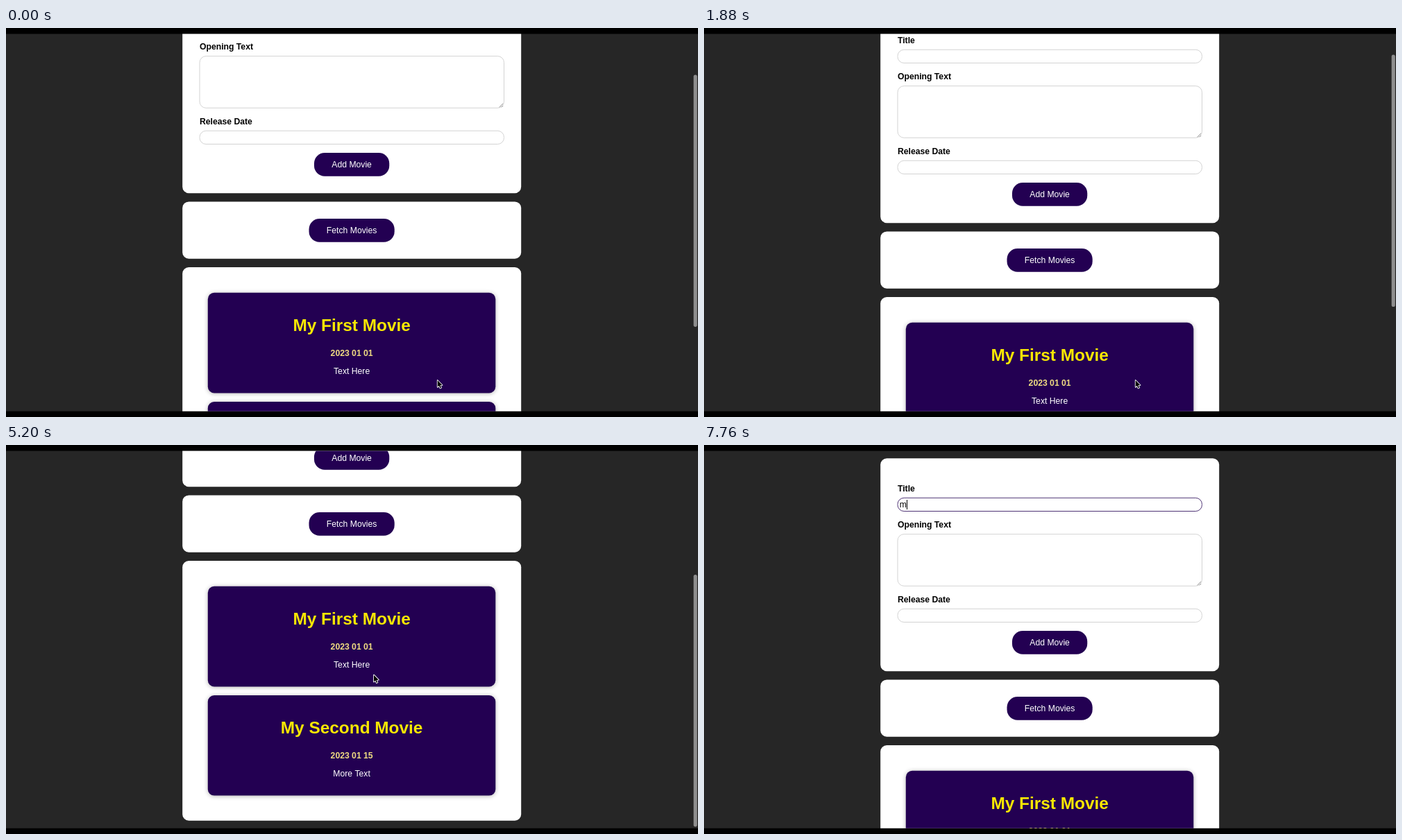
These frames come from a looping animation (997 px wide and 561 px high, 8000 ms). An HTML page with a canvas:

```html
<!DOCTYPE html>
<html lang="en">
<head>
<meta charset="utf-8">
<title>Movies</title>
<style>
html, body { margin: 0; width: 100%; height: 100%; overflow: hidden; background: #000; }
canvas { display: block; width: 997px; height: 561px; }
</style>
</head>
<body>
<canvas id="stage" width="997" height="561"></canvas>
<script>
const ctx = document.getElementById('stage').getContext('2d');
const LOOP = 8000, STEP = 40;
const CX = 498.1, SIZE = 12.2, RADIUS = 9.15;
const FONT = '"Liberation Sans", Arial, sans-serif';
const PURPLE = '#230052';

// Keys: [ms, value, slope per second]
const SCROLL = [
  [0, 88, 1000], [240, 266, 0], [680, 266, 0], [1280, 106, -200], [1640, 45, -80],
  [1641, 45, 0], [3199, 45, 0], [3200, 0, 0], [3800, 0, 0], [4600, 252, 60],
  [5040, 266, 0], [5200, 266, 0], [5880, 0, 0]
];
const MOUSE_X = [[2180, 621.7, 0], [3000, 530, 0], [5720, 530, 0], [6320, 439.6, 0]];
const MOUSE_Y = [[2180, 508, 0], [3000, 331.7, 0], [5720, 331.7, 0], [6320, 86, 0]];
const BAR_ALPHA = [
  [2160, 1, 0], [2440, 0, 0], [3800, 0, 0], [3840, 1, 0], [6060, 1, 0], [6300, 0, 0]
];
const FIELDS = [[75.9, 20], [128.2, 75.5], [235.9, 20]];
const FOCUS_AT = 6600, BLINK_AT = 7120, TYPE_AT = 7600;

// Cubic Hermite interpolation through the keys
function track(keys, t) {
  if (t <= keys[0][0]) return keys[0][1];
  const i = keys.findIndex(k => k[0] > t);
  if (i < 0) return keys[keys.length - 1][1];
  const [t0, a, m0] = keys[i - 1], [t1, b, m1] = keys[i];
  const d = t1 - t0, u = (t - t0) / d, u2 = u * u, u3 = u2 * u;
  return a + (b - a) * (3 * u2 - 2 * u3) +
    (m0 * (u3 - 2 * u2 + u) + m1 * (u3 - u2)) * d / 1000;
}

function box(x, y, w, h, r, fill) {
  ctx.beginPath();
  ctx.roundRect(x, y, w, h, r);
  ctx.fillStyle = fill;
  ctx.fill();
}

function text(str, x, y, color, { size = SIZE, bold = false, align = 'center' } = {}) {
  ctx.font = `${bold ? 'bold ' : ''}${size}px ${FONT}`;
  ctx.textAlign = align;
  ctx.fillStyle = color;
  ctx.fillText(str, x, y);
}

function line(color, width, ...points) {
  ctx.beginPath();
  points.forEach(([x, y], i) => i ? ctx.lineTo(x, y) : ctx.moveTo(x, y));
  ctx.strokeStyle = color;
  ctx.lineWidth = width;
  ctx.stroke();
}

function field([y, h], focused) {
  ctx.beginPath();
  ctx.roundRect(279, y + 0.4, 438.5, h - 0.8, RADIUS);
  ctx.strokeStyle = focused ? PURPLE : '#c8c8c8';
  ctx.lineWidth = 0.8;
  ctx.stroke();
}

function button(label, y, w) {
  box(CX - w / 2, y, w, 33.7, 15.25, PURPLE);
  text(label, CX, y + 21.1, '#fff');
}

function movie(y, title, date, body) {
  ctx.save();
  ctx.shadowColor = 'rgba(0,0,0,.3)';
  ctx.shadowBlur = 6;
  ctx.shadowOffsetY = 0.8;
  box(290.8, y, 414.5, 144.6, RADIUS, PURPLE);
  ctx.restore();
  text(title, CX, y + 54.7, '#f7e702', { size: SIZE * 2, bold: true });
  text(date, CX, y + 91.3, '#f0dc82', { bold: true });
  text(body, CX, y + 117.2, '#fff');
}

function form(t) {
  const label = { bold: true, align: 'left' };
  box(254.2, 19.2, 488, 307, RADIUS, '#fff');
  text('Title', 279, 67, '#000', label);
  text('Opening Text', 279, 119.2, '#000', label);
  text('Release Date', 279, 227.1, '#000', label);
  FIELDS.forEach((f, i) => field(f, i === 0 && t >= FOCUS_AT));
  line('#777', 0.8, [710.8, 202.3], [716.2, 196.9]);
  line('#777', 0.8, [713.9, 202.3], [716.2, 200]);
  button('Add Movie', 268, 108.3);

  const typed = t >= TYPE_AT;
  if (typed) text('m', 281.7, 90.2, '#000', { align: 'left' });
  if (typed || (t >= FOCUS_AT && t < BLINK_AT)) {
    ctx.fillStyle = '#000';
    ctx.fillRect(typed ? 292 : 281.8, 79, 1, 14);
  }
}

function arrow(x, y) {
  ctx.save();
  ctx.translate(x, y);
  ctx.beginPath();
  [[0, 0], [0, 9.8], [2.2, 7.8], [3.8, 11.4], [5.3, 10.7], [3.8, 7.2], [6.8, 7]]
    .forEach(p => ctx.lineTo(...p));
  ctx.closePath();
  ctx.lineJoin = 'round';
  ctx.lineWidth = 1.7;
  ctx.strokeStyle = '#fff';
  ctx.stroke();
  ctx.fillStyle = '#000';
  ctx.fill();
  ctx.restore();
}

function beam(x, y) {
  line('#111', 1.1, [x, y - 4.5], [x, y + 4.5]);
  for (const s of [-1, 1]) {
    line('#111', 1, [x - 2.4, y + s * 5.3], [x, y + s * 4.3], [x + 2.4, y + s * 5.3]);
  }
  line('#111', 0.9, [x - 1.4, y + 1.8], [x + 1.4, y + 1.8]);
}

function draw(t) {
  const scroll = track(SCROLL, t);
  ctx.fillStyle = '#000';
  ctx.fillRect(0, 0, 997, 561);

  ctx.save();
  ctx.beginPath();
  ctx.rect(0, 8.4, 997, 544.4);
  ctx.clip();
  ctx.fillStyle = '#262626';
  ctx.fillRect(0, 0, 997, 561);

  ctx.save();
  ctx.translate(0, -scroll);
  form(t);
  box(254.2, 338.4, 488, 82.4, RADIUS, '#fff');
  button('Fetch Movies', 363, 123.2);
  box(254.2, 433, 488, 374.8, RADIUS, '#fff');
  movie(469.8, 'My First Movie', '2023 01 01', 'Text Here');
  movie(627, 'My Second Movie', '2023 01 15', 'More Text');
  ctx.restore();

  ctx.globalAlpha = track(BAR_ALPHA, t);
  box(990.6, 8.4 + scroll * 0.671, 5.2, 363.5, 2.6, '#8e8e8e');
  ctx.globalAlpha = 1;

  // The pointer hides while typing
  if (t < TYPE_AT) {
    const x = track(MOUSE_X, t), y = track(MOUSE_Y, t);
    const inField = FIELDS.some(([top, h]) => y + scroll > top && y + scroll < top + h);
    (inField ? beam : arrow)(x, y);
  }
  ctx.restore();
}

const start = performance.now();
function tick() {
  const t = (performance.now() - start) % LOOP;
  draw(Math.floor(t / STEP) * STEP);
  requestAnimationFrame(tick);
}
tick();
</script>
</body>
</html>
```
